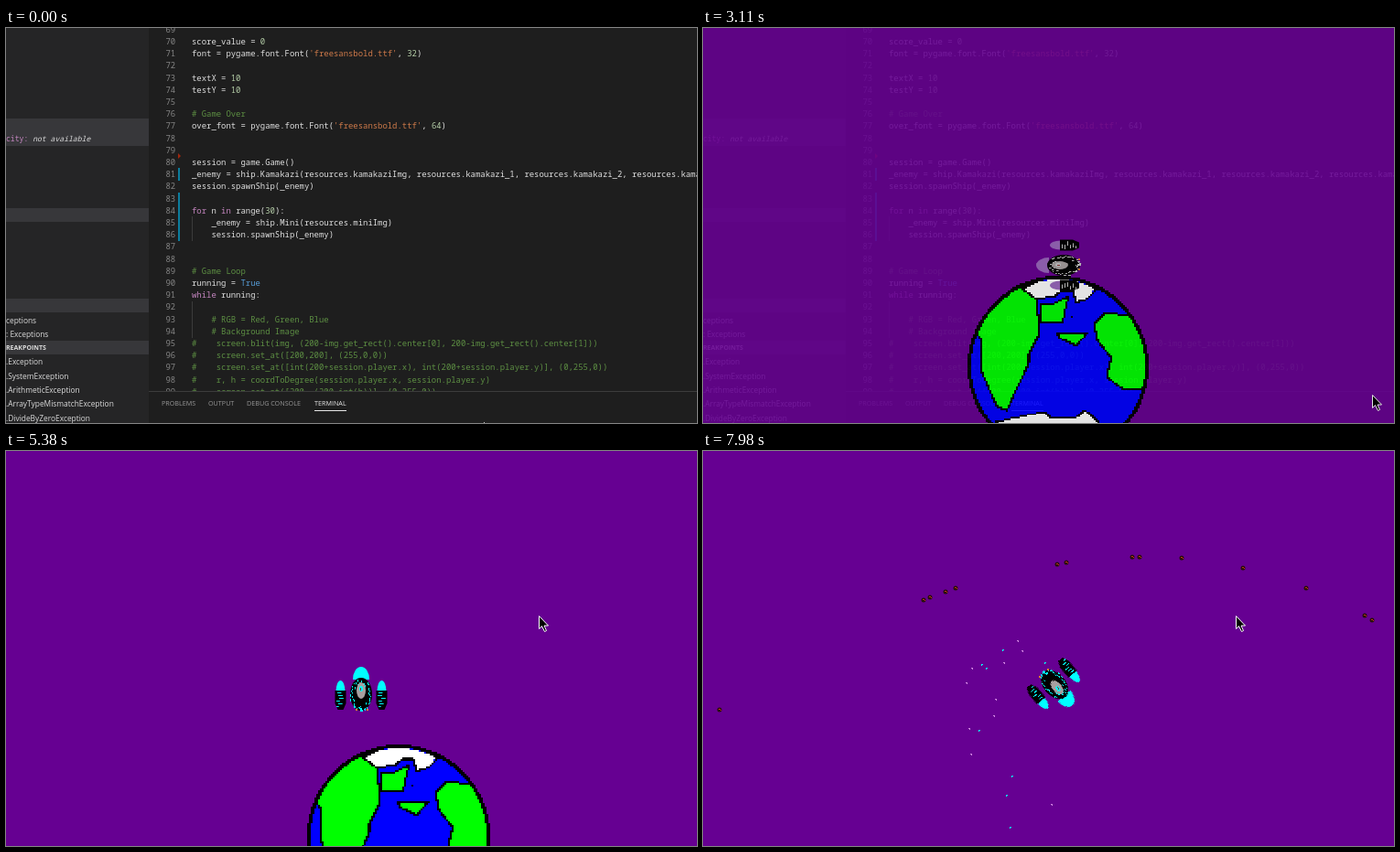
Recreate the animation shown at these times as an HTML page with a canvas. Size 755 by 432 pixels, loop 8000 ms.

```html
<!DOCTYPE html>
<html lang="en">
<meta charset="utf-8">
<title>Space game launch</title>
<style>
html, body { margin: 0; width: 755px; height: 432px; overflow: hidden; background: #1e1e1e; }
body { position: relative; }
body * { position: absolute; white-space: pre; }
span { position: static !important; }
#edit { left: 156px; top: 0; width: 599px; height: 397px; overflow: hidden; }
pre { margin: 0; top: -5.3px; font: 8.91px/13.2px "Noto Sans Mono", monospace; color: #e0e0e0; }
#nums { left: 18.5px; color: #858585; }
#code { left: 47px; }
.c { color: #5d8f43; } .s { color: #ce7a4a; } .n { color: #b5cea8; }
.k { color: #c586c0; } .b { color: #569cd6; }
#edit i { background: #0c7d9d; left: 32px; width: 2px; }
#edit u { background: #3c3c3c; left: 47px; width: 1px; }
#edit b { left: 32px; top: 137px; border: 3px solid transparent; border-left-color: #a1260d; border-right: 0; }
#side { left: 0; top: 0; width: 156px; height: 432px; background: #252526; overflow: hidden;
  font: 8.4px/16px "Open Sans", "Noto Sans", sans-serif; color: #dcdcdc; }
#side hr { margin: 0; border: 0; left: 0; width: 156px; height: 15px; background: #37373a; }
#side div { left: 0; }
#panel { left: 156px; top: 397px; width: 599px; height: 35px; background: #1e1e1e;
  border-top: 1px solid #3c3c3c; font: 7.2px/12px "Open Sans", "Noto Sans", sans-serif; color: #969696; }
#panel div { top: 6px; }
canvas { left: 0; top: 0; }
</style>
<body>
<div id="edit"><pre id="nums"></pre><pre id="code"></pre>
<i style="top:153px;height:14px"></i><i style="top:180px;height:53px"></i><b></b>
<u style="top:206px;height:27px"></u><u style="top:299px;height:40px"></u></div>
<div id="side">
<hr style="top:99px;height:30px"><hr style="top:197px"><hr style="top:296px"><hr style="top:342px">
<div style="top:113px;font:8.1px/16px 'Noto Sans Mono',monospace"><span class="k">city: </span><span style="font-style:italic">not available</span></div>
</div>
<div id="panel"></div>
<canvas id="stage" width="755" height="432"></canvas>
<script>
const source = `
score_value = 0
font = pygame.font.Font('freesansbold.ttf', 32)

textX = 10
testY = 10

# Game Over
over_font = pygame.font.Font('freesansbold.ttf', 64)


session = game.Game()
_enemy = ship.Kamakazi(resources.kamakaziImg, resources.kamakazi_1, resources.kamakazi_2, resources.kamakazi_3)
session.spawnShip(_enemy)

for n in range(30):
    _enemy = ship.Mini(resources.miniImg)
    session.spawnShip(_enemy)


# Game Loop
running = True
while running:

    # RGB = Red, Green, Blue
    # Background Image
#    screen.blit(img, (200-img.get_rect().center[0], 200-img.get_rect().center[1]))
#    screen.set_at([200,200], (255,0,0))
#    screen.set_at([int(200+session.player.x), int(200+session.player.y)], (0,255,0))
#    r, h = coordToDegree(session.player.x, session.player.y)
#    screen.set_at([200, (200-int(h))], (0,255,0))`;
const $ = id => document.getElementById(id);
const syntax = /(#.*)|('.*?')|\b(\d+)\b|\b(for|in|while)\b|\b(True)\b/g;
$('code').innerHTML = source.replace(syntax, (m, ...g) =>
  `<span class="${'csnkb'[g.slice(0, 5).findIndex(Boolean)]}">${m}</span>`);
$('nums').textContent = source.split('\n').map((_, i) => 69 + i).join('\n');

const addText = (id, text, css) => {
  const d = document.createElement('div');
  d.textContent = text;
  d.style.cssText = css;
  $(id).append(d);
};
['ceptions', ': Exceptions', 'REAKPOINTS', '.Exception', '.SystemException', '.ArithmeticException',
  '.ArrayTypeMismatchException', '.DivideByZeroException'].forEach((s, i) =>
  addText('side', s, `top:${311.5 + i * 15.3}px;` + (i == 2 ? 'font-weight:700;font-size:7px' : '')));
addText('panel', 'PROBLEMS', 'left:14px');
addText('panel', 'OUTPUT', 'left:65px');
addText('panel', 'DEBUG CONSOLE', 'left:107px');
addText('panel', 'TERMINAL', 'left:181px;color:#e7e7e7;border-bottom:1px solid #e7e7e7;padding-bottom:2px');

const ctx = $('stage').getContext('2d');
const W = 755, H = 432, CYAN = '#00ffff';
const rand = n => { const v = Math.sin(n * 12.9898 + 4) * 43758.5453; return v - Math.floor(v); };
const unit = v => Math.max(0, Math.min(1, v));

function sprite(size, draw) {
  const c = document.createElement('canvas');
  c.width = c.height = size;
  const g = c.getContext('2d');
  g.translate(size / 2, size / 2);
  draw(g);
  return c;
}

function poly(g, pts, fill, stroke, width = 1) {
  g.beginPath();
  for (let i = 0; i < pts.length; i += 2) g.lineTo(pts[i], pts[i + 1]);
  g.closePath();
  g.fillStyle = fill;
  g.fill();
  if (!stroke) return;
  g.strokeStyle = stroke;
  g.lineWidth = width;
  g.stroke();
}

function disc(g, x, y, rx, ry, fill) {
  g.beginPath();
  g.ellipse(x, y, rx, ry, 0, 0, 7);
  g.fillStyle = fill;
  g.fill();
}

const earth = sprite(100, g => {
  g.scale(.5, .5);
  disc(g, 0, 0, 100, 100, '#000');
  disc(g, 0, 0, 96, 96, '#00f');
  g.clip();
  const land = (fill, ...pts) => poly(g, pts, fill, '#000', 2.2);
  land('#0f0', -36,-87, -24,-75, -20,-37, -32,-13, -32,-3, -53,41, -57,48, -68,44, -85,5, -86,-33, -99,-40, -55,-99);
  land('#0f0', -19,-70, -6,-69, 11,-77, 5,-50, -19,-49);
  land('#0f0', -1,-37, 32,-37, 20,-23, 2,-31);
  land('#0f0', 41,-48, 52,-59, 80,-57, 110,-42, 100,24, 72,25, 54,12, 59,-9, 43,-30);
  land('#fff', -39,-86, 0,-105, 43,-86, 33,-75, 20,-71, 16,-84, 4,-84, -4,-77, -25,-75);
  land('#fff', -70,62, -15,50, -8,57, 18,58, 30,48, 46,62, 0,110);
  disc(g, 15, -55, 2, 2, '#000');
  // Snap every channel so that edges stay blocky.
  const img = g.getImageData(0, 0, 100, 100);
  img.data.forEach((v, i) => img.data[i] = v > 127 ? 255 : 0);
  g.putImageData(img, 0, 0);
});

function makeShip(cone, trim) {
  return sprite(60, g => {
    const nose = (x, y, w, h) => {
      g.save();
      g.beginPath();
      g.rect(-30, -30, 60, 30 + y);
      g.clip();
      disc(g, x, y, w, h, cone);
      g.restore();
    };
    const bar = (x, y, w, h, color = trim) => {
      g.fillStyle = color;
      g.fillRect(Math.round(x), Math.round(y), w, h);
    };
    nose(0, -10, 9, 14);
    disc(g, 0, 6, 12, 18, '#000');
    // Broken plating lines around the hull.
    for (let i = 0; i < 44; i++) {
      const a = i / 7, r = .7 + .3 * rand(i);
      bar(12 * r * Math.cos(a) - .5, 6 + 17 * r * Math.sin(a), 1, 1 + 2 * rand(i + 50));
    }
    for (const x of [-22.5, 22.5]) {
      nose(x, 3, 5, 12);
      poly(g, [x - 6, 2, x + 6, 2, x + 6, 16, x + 3, 23, x - 3, 23, x - 6, 16], '#000');
      for (let y = 4; y < 22; y += 3) bar(x - 5 + 5 * rand(y + x), y, 2 + 3 * rand(y), 1);
      bar(x / 4, 22, 2, 2, '#e08030');
    }
    disc(g, 0, 2, 5, 9, '#a8a0a0');
    disc(g, 0, 0, 2, 3, trim);
    bar(-1, -1, 1, 3, '#803030');
    bar(-1, 21, 2, 4);
  });
}
const idleShip = makeShip('#9a66bd', '#c8c8c8'), liveShip = makeShip(CYAN, CYAN);

const tick = t => 7980 - Math.ceil((7980 - t) / 72) * 72;

// Degrees clockwise from straight up.
const heading = t => Math.min(0, -90 + Math.max(0, t - 4520) * .135) + Math.max(0, t - 6686) * .108;

// Drift of the world past the ship: up to TURN it flies upwards, then down to the right.
const TURN = 7260, turned = t => Math.max(0, t - TURN) / 720;
const drift = t => [-34 * turned(t), Math.min(0, t - TURN) * .195 - 27 * turned(t)];

function drawEarth(t) {
  const s = Math.max(0, t - 4520) / 1000;
  const x = 388 + 42 * unit(s / .806), y = 372 + 38 * s + 30 * s * s;
  ctx.drawImage(earth, Math.round(x) - 100, Math.round(y) - 100, 200, 200);
}

function drawSparks(t) {
  for (let i = 0; i < 18; i++) {
    const birth = 6640 + i * 75, age = t - birth;
    if (age < 0) continue;
    const pink = rand(i) > .6, spread = (rand(i + 30) - .6) * (pink ? 80 : 36);
    const back = heading(birth) * Math.PI / 180, d = (45 + 20 * rand(i + 60)) * unit(age / 150);
    const [x1, y1] = drift(t), [x0, y0] = drift(birth);
    const x = Math.round(388 - Math.sin(back) * d + Math.cos(back) * spread + x1 - x0);
    const y = Math.round(260 + Math.cos(back) * d + Math.sin(back) * spread + y1 - y0);
    ctx.fillStyle = pink ? '#d080e0' : CYAN;
    ctx.fillRect(x, y, 2, 1);
    ctx.fillRect(x + pink, y + 1, 1, 1);
  }
}

// Enemies sit along a lopsided arc and close in on its middle.
const line = [1, 234, 241, 261, 274, 428, 443, 540, 549, 602, 674, 745, 810, 818];
function drawEnemies(t) {
  const p = (t - TURN) / 720, q = turned(t);
  const top = 104 + Math.min(0, t - TURN) * .195 + 12 * q;
  line.forEach(x0 => {
    const bend = x => (x - 510) ** 2 * (x > 510 ? .00118 : .00075);
    const x = Math.round(x0 - p * (35 + 53 * Math.tanh((x0 - 410) / 160)));
    const y = Math.round(top + bend(q ? x + 20 * q : x0));
    disc(ctx, x, y, 2.5, 2.5, '#28100c');
    ctx.fillStyle = '#c03018';
    ctx.fillRect(x - 1, y - 1, 2, 1);
    ctx.fillRect(x + 1, y, 1, 1);
  });
}

function drawGame(t, shown) {
  ctx.fillStyle = '#660092';
  ctx.fillRect(0, 0, W, H);
  ctx.save();
  // The window grows a little while it fades in.
  const zoom = .9 + .1 * shown;
  ctx.translate(W / 2, H / 2);
  ctx.scale(zoom, zoom);
  ctx.translate(-W / 2, -H / 2);
  drawEarth(t);
  drawSparks(t);
  drawEnemies(t);
  ctx.translate(388, 260);
  ctx.rotate(heading(t) * Math.PI / 180);
  ctx.drawImage(t < 5300 ? idleShip : liveShip, -30, -30);
  ctx.restore();
}

function drawPointer(t) {
  if (t >= 100 && t < 2110) return;
  const a = unit((t - 2110) / 330), b = unit((t - 3610) / 310);
  const x = 522 + 209 * a - 149 * b, y = 431 - 30 * a - 40 * Math.sin(a * Math.PI) - 221 * b;
  ctx.save();
  ctx.translate(Math.round(x) + .5, Math.round(y) + .5);
  poly(ctx, [0,0, 0,14, 3,11, 6,17, 8,16, 5.5,10.5, 10,10.5], '#000', '#fff');
  ctx.restore();
}

function drawTextPointer() {
  ctx.fillStyle = '#d4d4d4';
  ctx.fillRect(638, 151, 1, 14);
  for (const y of [150, 165]) ctx.fillRect(635, y, 7, 1);
}

function frame(now) {
  const raw = now % 8000, t = tick(raw);
  ctx.clearRect(0, 0, W, H);
  ctx.imageSmoothingEnabled = false;
  const shown = raw < 3050 ? 0 : raw < 3110 ? .6 : raw < 3170 ? .88 : 1;
  if (shown) drawGame(t, shown);
  else if (raw >= 2910) {
    ctx.fillStyle = `rgba(0,0,0,${raw < 2970 ? .12 : .3})`;
    ctx.fillRect(0, 0, W, H);
  }
  $('stage').style.opacity = shown || 1;
  if (raw >= 1750 && raw < 1830) drawTextPointer();
  drawPointer(raw < 2110 ? raw : Math.max(2110, t));
  requestAnimationFrame(frame);
}
requestAnimationFrame(frame);
</script>
</body>
</html>
```
